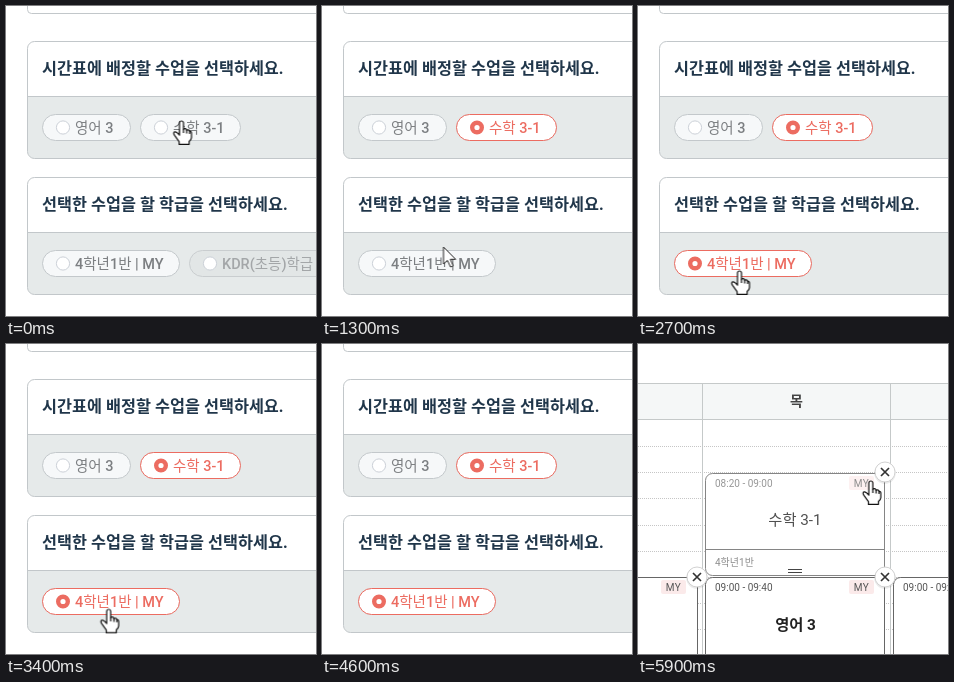
These frames come from a looping animation (310x310 px, 6000 ms). An HTML page:

```html
<!DOCTYPE html>
<html lang="ko">
<head>
<meta charset="utf-8">
<title>시간표 수업 배정</title>
<style>
  html, body { margin: 0; width: 100%; height: 100%; overflow: hidden; background: #fff; }
  svg { display: block; width: 100vw; height: 100vh; }
  text { font-family: Roboto, "Noto Sans CJK KR", sans-serif; white-space: pre; }
  .line { fill: none; stroke: #c2c7ca; }
  .title { font-size: 16.3px; font-weight: 700; fill: #20364a; }
  .pill text, #ghost { font-size: 14.5px; font-weight: 500; fill: #7c7f82; }
  .pill rect { fill: #f6f8f9; stroke: #c3c8cb; }
  .pill circle { fill: #fff; stroke: #ccd1d8; }
  .pill.on rect { fill: #fff; stroke: #ec6c61; }
  .pill.on circle { stroke: #ec6c61; stroke-width: 4.4; }
  .pill.on text { fill: #ec6c61; }
  .pill.off rect { fill: #e2e6e6; stroke: #c9cdcf; }
  .pill.off text { fill: #a3a6a8; }
  #ghost { font-weight: 400; fill: #4e5254; }
  .small { font-size: 10px; }
  .mid { text-anchor: middle; }
</style>
</head>
<body>
<svg viewBox="0 0 310 310">
  <g id="form"></g>
  <g id="grid"></g>
  <g id="cursor">
    <text id="ghost" x="-67" y="-11">4학년1반 | MY</text>
    <path id="arrow" d="M0 0V17L4 13.4 7 20 9.7 18.8 6.8 12.3H12.2Z"
      fill="#fff" stroke="#222" stroke-linejoin="round"/>
    <g id="hand" fill="#fff" stroke="#111" stroke-width="1.2" stroke-linejoin="round">
      <path d="M-2 13V2A2 2 0 0 1 2 2V8.3Q3.5 6.8 5.2 8.6V9.3Q7 8 8.1 10V10.6Q10 10 10 12.3V16.5
        Q10 18.5 7.6 20.5V23.4H-2.4V20.6L-6.9 14.4Q-8.6 11.6-6.9 10.9-5 10.3-2 14.2Z"/>
      <path d="M2 8.3V12M5.2 9V12.4M8.1 10.4V13" fill="none"/>
    </g>
  </g>
</svg>
<script>
const LOOP = 6000, TICK = 100;
const $ = id => document.getElementById(id);

// ---- drawing helpers ----
const label = (x, y, str, attrs = '') => `<text x="${x}" y="${y}" ${attrs}>${str}</text>`;

const panel = (y, h, split, title) => `
  <rect x="21.5" y="${y}" width="320" height="${h}" rx="7" fill="#e6eaea"/>
  <path d="M21.5 ${split}V${y + 7}a7 7 0 0 1 7-7H320V${split}Z" fill="#fff"/>
  <path class="line" d="M21.5 ${split}H310"/>
  <rect class="line" x="21.5" y="${y}" width="320" height="${h}" rx="7"/>
  ${label(36, split - 22.7, title, 'class="title"')}`;

const pill = (x, y, w, str, state = '', id = '') => `
  <g class="pill ${state}" id="${id}">
    <rect x="${x}" y="${y}" width="${w}" height="26" rx="13"/>
    <circle cx="${x + 20.5}" cy="${y + 13}" r="${state === 'on' ? 4.8 : 6.6}"/>
    ${label(x + 32.5, y + 18.2, str)}
  </g>`;

const tag = (x, y, ink, bg) =>
  `<rect x="${x}" y="${y}" width="25" height="14" rx="2" fill="${bg}"/>` +
  label(x + 12.5, y + 10.5, 'MY', `class="small mid" fill="${ink}" letter-spacing=".4"`);

const box = (x, y, w, h, ink) =>
  `<rect x="${x}" y="${y}" width="${w}" height="${h}" rx="7" fill="#fff" stroke="${ink}"/>`;

const closer = (x, y) => `
  <circle cx="${x}" cy="${y + 1}" r="10.8" fill="#000" opacity=".08"/>
  <circle cx="${x}" cy="${y}" r="10" fill="#fff" stroke="#d2d2d2"/>
  <path d="M${x - 4} ${y - 4}l8 8m0-8l-8 8" stroke="#333" stroke-width="1.7"/>`;

// ---- selection form ----
$('form').innerHTML = `
  <path class="line" d="M21.5 0V3.5a4 4 0 0 0 4 4H310"/>
  ${panel(35.5, 117, 90.5, '시간표에 배정할 수업을 선택하세요.')}
  ${panel(171.5, 117, 226.5, '선택한 수업을 할 학급을 선택하세요.')}
  ${pill(36.5, 108.5, 88, '영어 3')}
  ${pill(134.5, 108.5, 100, '수학 3-1')}
  ${pill(134.5, 108.5, 100, '수학 3-1', 'on', 'mathOn')}
  ${pill(36.5, 244.5, 137, '4학년1반 | MY')}
  ${pill(36.5, 244.5, 137, '4학년1반 | MY', 'on', 'classOn')}
  ${pill(183.5, 244.5, 160, 'KDR(초등)학급', 'off', 'otherClass')}`;

// ---- timetable ----
const dots = Array.from({ length: 8 }, (_, i) => `M0 ${102.5 + Math.round(i * 26.2)}H310`).join('');
$('grid').innerHTML = `
  <rect width="310" height="310" fill="#fff"/>
  <rect y="39" width="310" height="36" fill="#f5f7f7"/>
  <path d="${dots}" stroke="#c6c6c6" stroke-dasharray="1 1"/>
  <path d="M0 39.5H310M0 75.5H310M64.5 39V310M252.5 39V310" stroke="#c5c9c9"/>
  ${label(158.5, 62, '목', 'class="mid" font-size="14" font-weight="700" fill="#444"')}
  ${box(67.5, 129.5, 179, 102, '#858585')}
  <path d="M67.5 205.5H246.5" stroke="#858585"/>
  <path d="M150 225.5h14m-14 3h14" stroke="#444"/>
  ${label(77, 142.5, '08:20 - 09:00', 'class="small" fill="#969696"')}
  ${tag(211, 132, '#8c8c8c', '#fdf1f1')}
  ${label(157, 181.3, '수학 3-1', 'class="mid" font-size="15.3" fill="#505050"')}
  ${label(77, 222, '4학년1반', 'class="small" fill="#8c8c8c"')}
  ${box(-120.5, 233.5, 180, 100, '#666')}
  ${box(67.5, 233.5, 179, 100, '#666')}
  ${box(255.5, 233.5, 179, 100, '#666')}
  ${label(77, 246.5, '09:00 - 09:40', 'class="small" fill="#555"')}
  ${label(265, 246.5, '09:00 - 09:40', 'class="small" fill="#555"')}
  ${tag(23, 236, '#555', '#fbeaea')}
  ${tag(211, 236, '#555', '#fbeaea')}
  ${label(157.5, 286.3, '영어 3', 'class="mid" font-size="15.3" font-weight="700" fill="#222"')}
  ${closer(247, 128)}${closer(59, 233)}${closer(247, 233)}`;

// ---- motion ----
const play = (el, frames) => el.animate(frames, { duration: LOOP, iterations: Infinity });

// Visible during each [from, to) span.
function show(id, ...spans) {
  const frames = [];
  const add = (ms, opacity) => frames.push({ offset: ms / LOOP, opacity, easing: 'step-end' });
  if (spans[0][0] > 0) add(0, 0);
  for (const [from, to] of spans) { add(from, 1); add(to, 0); }
  if (frames[frames.length - 1].offset < 1) add(LOOP, 0);
  play($(id), frames);
}

// Waypoints [ms, x, y], walked in ticks.
function travel(id, points) {
  play($(id), points.map(([ms, x, y], i) => {
    const next = points[i + 1];
    const ticks = next ? Math.max(1, Math.round((next[0] - ms) / TICK)) : 1;
    return { offset: ms / LOOP, transform: `translate(${x}px, ${y}px)`, easing: `steps(${ticks}, end)` };
  }));
}

show('form', [0, 5000]);
show('grid', [5000, LOOP]);
show('mathOn', [200, LOOP]);
show('otherClass', [0, 200]);
show('classOn', [2700, LOOP]);
show('hand', [0, 1100], [1500, 4600], [5000, LOOP]);
show('arrow', [1100, 1500]);
show('ghost', [3800, 4600]);

travel('cursor', [
  [0, 175.5, 115], [200, 175.5, 115], [900, 176, 119], [1000, 172, 134],
  [1100, 158, 172], [1200, 138, 214], [1300, 121.5, 241], [1500, 112, 247],
  [1900, 101.5, 265], [3300, 101.5, 265], [3600, 105, 266], [3800, 109, 268],
  [4000, 123.5, 277], [4200, 146, 288], [4500, 186, 312],
  [4600, 196, 340], [5000, 232.8, 137], [LOOP, 232.8, 137]
]);
</script>
</body>
</html>
```
